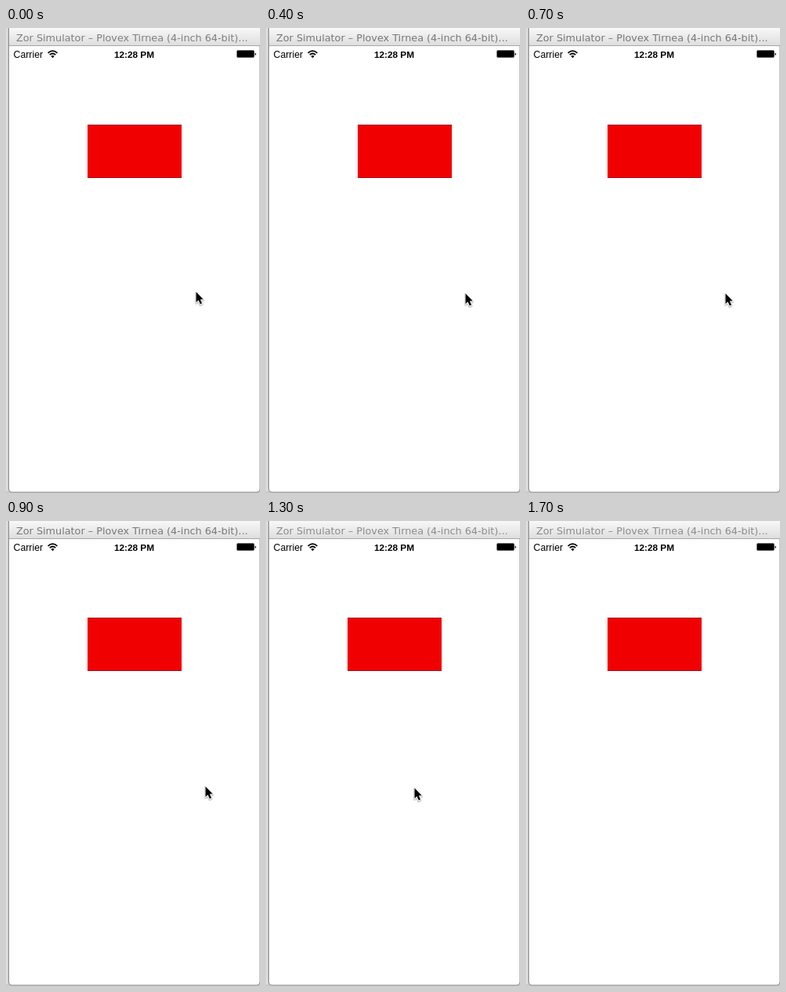
Recreate the animation shown at these times as an HTML page. Size 324 px wide and 592 px high, loop 2.7 s.

```html
<!DOCTYPE html>
<html lang="en">
<head>
<meta charset="utf-8">
<title>Shaking box</title>
<style>
html, body { margin: 0; width: 100%; height: 100%; overflow: hidden; background: #fff; }
svg { display: block; width: 324px; height: 592px; }
.title { font: 12.8px "DejaVu Sans", sans-serif; fill: #757575; animation: dim 2.7s step-end infinite; }
.status { font: 12.3px "Liberation Sans", Arial, sans-serif; }
.clock { font: bold 11.8px "Liberation Sans", Arial, sans-serif; }
.box { animation: shake 2.7s step-end infinite; }
.cursor { animation: point 2.7s step-end infinite; }

@keyframes shake {
  0% { transform: none; }
  14.8% { transform: translateX(13px); }
  18.5% { transform: translateX(-28.5px); }
  22.2% { transform: translateX(7px); }
  25.9%, 100% { transform: none; }
}
@keyframes point {
  0% { transform: translate(242px, 336px); }
  3.7% { transform: translate(246px, 337px); }
  7.4% { transform: translate(251px, 338px); }
  11.1% { transform: translate(254px, 338px); }
  48.1% { transform: translate(189px, 340px); }
  51.8%, 100% { transform: translate(189px, 340px); visibility: hidden; }
}
@keyframes dim {
  0% { fill: #808080; }
  3.7% { fill: #787878; }
  48.1%, 100% { fill: #8c8c8c; }
}
</style>
</head>
<body>
<svg viewBox="0 0 324 592">
  <defs>
    <linearGradient id="bar" x2="0" y2="1">
      <stop offset="0" stop-color="#f8f8f8"/>
      <stop offset="1" stop-color="#dedede"/>
    </linearGradient>
    <linearGradient id="shade">
      <stop offset="0" stop-color="#e6e6e6"/>
      <stop offset="1" stop-color="#c4c4c4"/>
    </linearGradient>
    <path id="arrow" d="M.5 0V13.2L3.5 10.5L5.8 15.5L8 14.5L5.8 9.6H9.7Z"/>
  </defs>

  <!-- window -->
  <rect width="4" height="592" fill="url(#shade)"/>
  <rect y="590" width="324" height="2" fill="#c8c8c8"/>
  <path d="M3.5 0V587Q3.5 591 7.5 591H320Q324 591 324 587V0Z" fill="#fff" stroke="#8a8a8a"/>
  <rect x="4" width="320" height="22" fill="url(#bar)"/>
  <rect x="4" y="22" width="320" height="1" fill="#a6a6a6"/>
  <text class="title" x="13" y="17">Zor Simulator – Plovex Tirnea (4-inch 64-bit)...</text>

  <!-- status bar -->
  <text class="status" x="9.5" y="38">Carrier</text>
  <text class="clock" x="163.5" y="38" text-anchor="middle">12:28 PM</text>
  <g fill="none" stroke="#000" stroke-width="1.8">
    <path d="M53.6 31.8Q59.5 26.4 65.4 31.8"/>
    <path d="M55.8 34.2Q59.5 30.8 63.2 34.2"/>
  </g>
  <path d="M57.3 35.8Q59.5 34 61.7 35.8L59.5 38.2Z"/>
  <rect x="294.5" y="28.5" width="22" height="9" rx="1.5" stroke="#666"/>
  <path d="M317.6 31.5Q319 32 319 33.25T317.6 35Z"/>

  <!-- box with a darker rim -->
  <g class="box">
    <rect x="104" y="123" width="120" height="68" fill="#a01020"/>
    <rect x="104" y="124" width="120" height="66" fill="#f10002"/>
  </g>

  <g class="cursor">
    <use href="#arrow" y="1" fill="none" stroke="#000" stroke-opacity=".2" stroke-width="3.4" stroke-linejoin="round"/>
    <use href="#arrow" stroke="#fff" stroke-width="1.6" paint-order="stroke"/>
  </g>
</svg>
</body>
</html>
```
